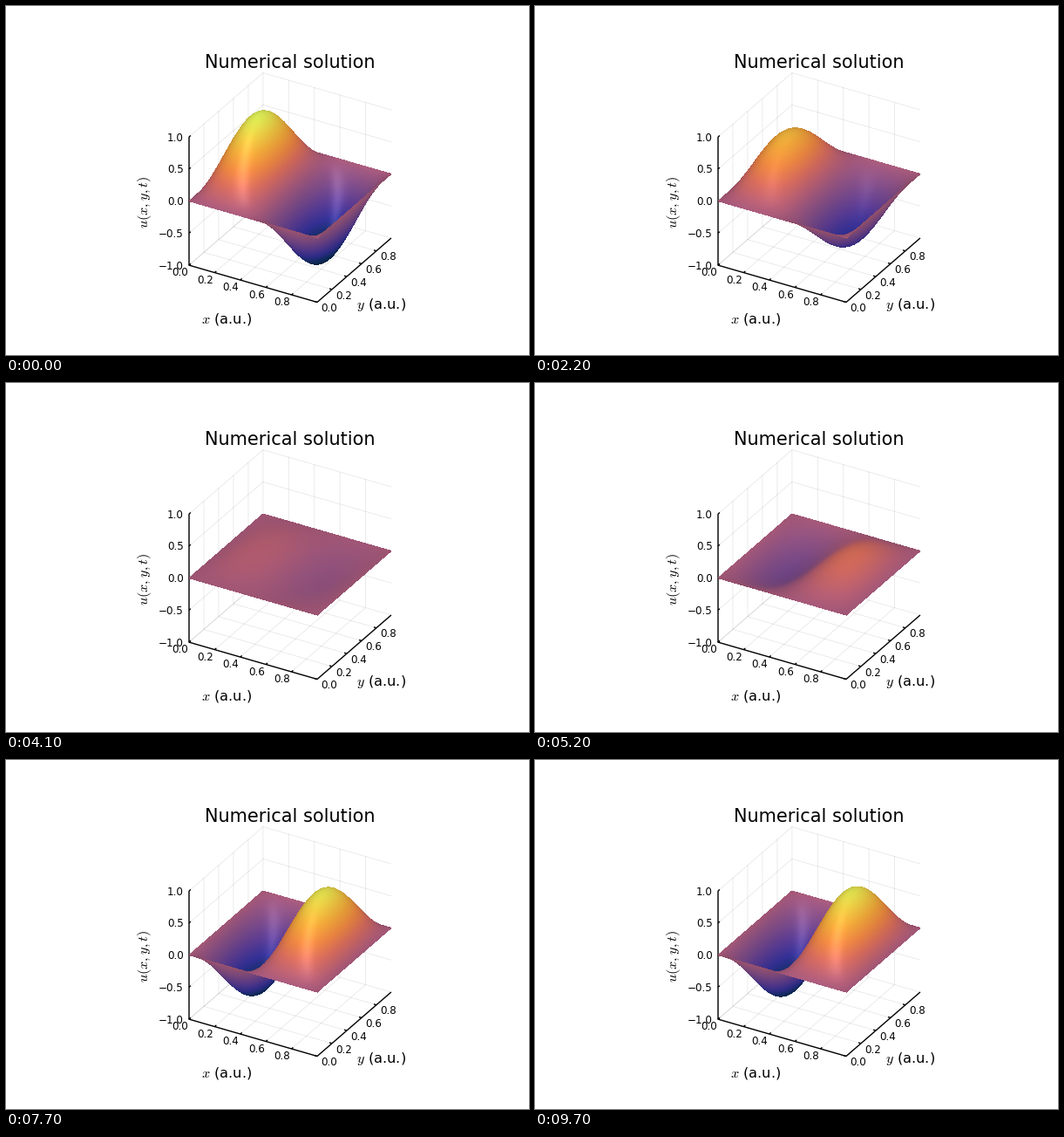
A matplotlib script for the animation above (9800 ms loop, 600x400 px).

```python
import numpy as np
import matplotlib.pyplot as plt
from matplotlib.animation import FuncAnimation
from matplotlib.colors import LinearSegmentedColormap

W, H, DPI = 600, 400, 100
FRAMES, INTERVAL = 98, 100
HALF_PERIOD = 87.5          # frames from crest to trough
AMBIENT, DIFFUSE, GLOSS = 0.8, 0.2, 0.12

plt.rcParams.update({"font.family": "DejaVu Sans", "mathtext.fontset": "cm"})

# Orthographic camera: azimuth 30 degrees, elevation 30 degrees
ORIGIN = np.array([210.0, 223.6])
EX = np.array([147.0, 42.4])
EY = np.array([84.9, -73.5])
EZ = np.array([0.0, -73.5])
VIEW = (0.433, -0.75, 0.5)

THERMAL = [(3, 35, 51), (13, 48, 100), (53, 50, 155), (93, 62, 153),
           (126, 77, 143), (158, 89, 135), (193, 100, 121), (225, 113, 97),
           (246, 139, 69), (251, 173, 60), (246, 211, 70), (231, 250, 90)]
cmap = LinearSegmentedColormap.from_list("heat", np.array(THERMAL) / 255, N=512)
LUT = (cmap(np.arange(512))[:, :3] * 255).astype(np.float32)


def project(x, y, z):
    return ORIGIN + x * EX + y * EY + z * EZ


fig = plt.figure(figsize=(W / DPI, H / DPI), dpi=DPI, facecolor="white")
ax = fig.add_axes([0, 0, 1, 1])
ax.axis("off")


def line(points, **style):
    xs, ys = zip(*points)
    ax.plot(xs, ys, **style)


def label(x, y, text, px, **kw):
    kw.setdefault("ha", "center")
    ax.text(x, y, text, fontsize=px * 72 / DPI, va="baseline", color="black", **kw)


def draw_axes():
    grid = dict(color="black", alpha=0.1, lw=0.55, zorder=1)
    axis = dict(color="black", lw=1.0, zorder=2, solid_capstyle="butt")
    for v in np.arange(5) * 0.2:
        line([project(v, 0, -1), project(v, 1, -1), project(v, 1, 1)], **grid)
        line([project(1, v, -1), project(0, v, -1), project(0, v, 1)], **grid)
    for z in np.linspace(-1, 1, 5):
        line([project(0, 0, z), project(0, 1, z), project(1, 1, z)], **grid)

    line([project(0, 0, 1), project(0, 0, -1), project(1, 0, -1),
          project(1, 1, -1)], **axis)
    for i in range(5):
        v, z = i * 0.2, i * 0.5 - 1
        line([project(v, 0, -1), project(v, 0.022, -1)], **axis)
        line([project(1, v, -1), project(0.98, v, -1)], **axis)
        line([project(0, 0, z), project(0, 0.022, z)], **axis)
        label(199.5 + 29.25 * i, 309.2 + 8.45 * i, f"{v:.1f}", 11.9)
        label(371 + 17 * i, 350.4 - 14.9 * i, f"{v:.1f}", 11.9)
        label(203.5, 154.7 + 36.75 * (4 - i), f"{z:.1f}".replace("-", "\u2212"),
              11.9, ha="right")

    label(326, 71, "Numerical solution", 20.9)
    label(253.5, 364, "$x$ (a.u.)", 16.3)
    label(431, 347, "$y$ (a.u.)", 16.3)
    label(163, 224.5, "$u(x,y,t)$", 16.3, rotation=90, rotation_mode="anchor")


# Surface samples, ordered from the far side to the near side
gx, gy = np.meshgrid(np.linspace(0, 1, 640), np.linspace(0, 1, 420))
gx, gy = gx.ravel(), gy.ravel()
order = np.argsort(VIEW[0] * gx + VIEW[1] * gy)
gx, gy = gx[order], gy[order]
sin_x, cos_x = np.sin(2 * np.pi * gx), np.cos(2 * np.pi * gx)
sin_y, cos_y = np.sin(np.pi * gy), np.cos(np.pi * gy)
shape = (sin_x * sin_y).astype(np.float32)
slope_x = (np.pi * cos_x * sin_y).astype(np.float32)
slope_y = (np.pi / 2 * sin_x * cos_y).astype(np.float32)
col = (ORIGIN[0] + gx * EX[0] + gy * EY[0]).astype(int)
base_row = (ORIGIN[1] + gx * EX[1] + gy * EY[1]).astype(np.float32)


def render(n):
    amp = np.float32(np.cos(np.pi * n / HALF_PERIOD))
    u = amp * shape
    zx, zy = amp * slope_x, amp * slope_y
    facing = np.abs(VIEW[2] - VIEW[0] * zx - VIEW[1] * zy)
    facing /= np.sqrt(1 + zx * zx + zy * zy)
    shine = facing ** 2
    for _ in range(4):
        shine *= shine
    rgb = LUT[((u + 1) * 255.5).astype(int)]
    rgb *= (AMBIENT + DIFFUSE * facing)[:, None]
    rgb += (255 * GLOSS * shine)[:, None]
    row = (base_row + EZ[1] * u).astype(int)
    img = np.zeros((H, W, 4), np.uint8)
    img[row, col, :3] = np.minimum(rgb, 255).astype(np.uint8)
    img[row, col, 3] = 255
    return img


draw_axes()
surface = ax.imshow(render(0), extent=(0, W, H, 0), interpolation="nearest",
                    aspect="auto", zorder=5)
ax.set_xlim(0, W)
ax.set_ylim(H, 0)


def update(n):
    surface.set_data(render(n))
    return [surface]


anim = FuncAnimation(fig, update, frames=FRAMES, interval=INTERVAL,
                     repeat=True, repeat_delay=0, blit=False)
plt.show()
```
